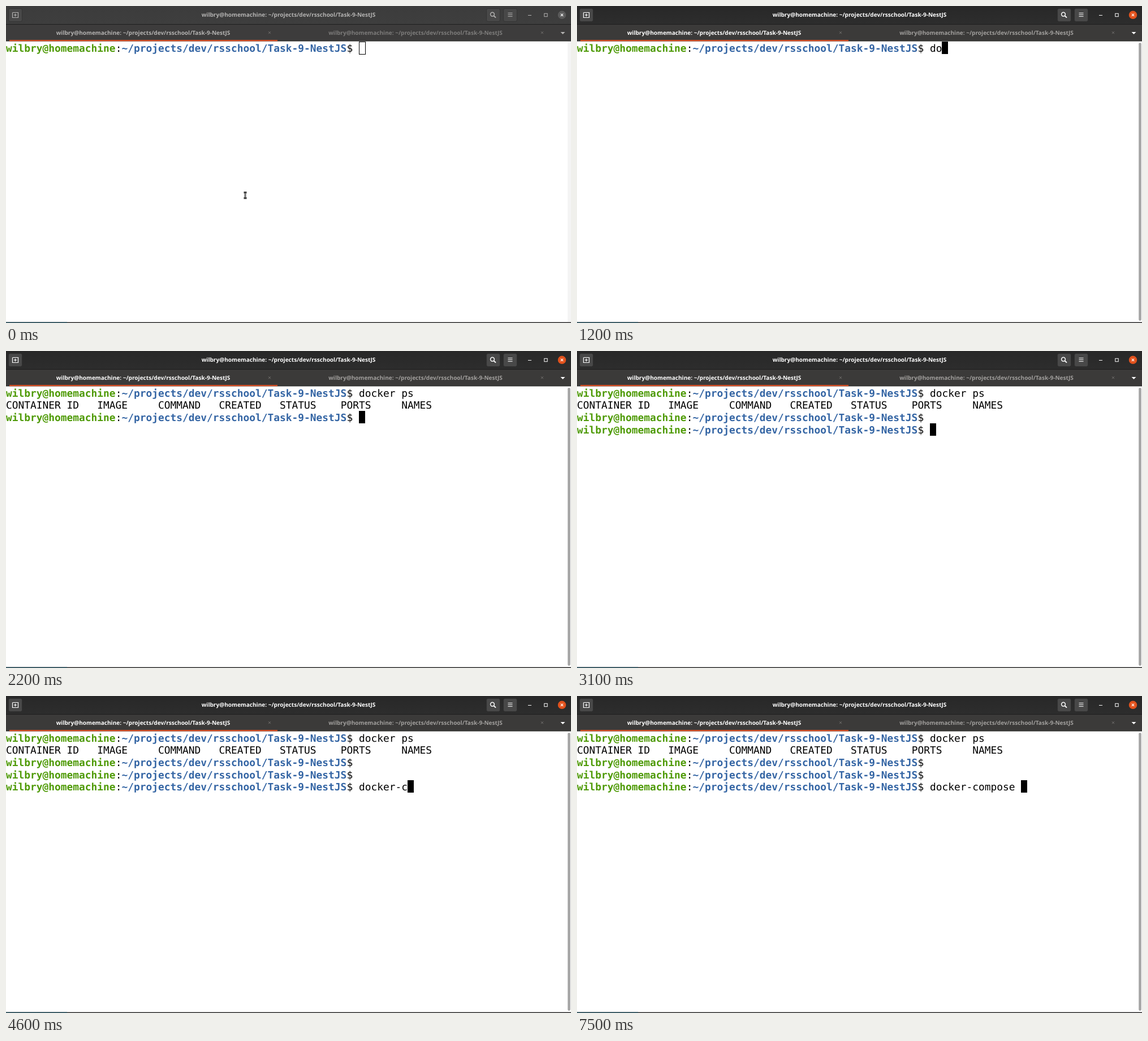
Write an HTML page that moves like this. It is 999x561 px and loops after 8 s.

```html
<!DOCTYPE html>
<html lang="en">
<head>
<meta charset="utf-8">
<title>Terminal</title>
<style>
html, body { margin: 0; width: 100%; height: 100%; overflow: hidden; background: #fff; }
svg { display: block; width: 999px; height: 561px; }
text { white-space: pre; text-rendering: geometricPrecision; }
.ui { font: 700 10px "Open Sans", "Noto Sans", sans-serif; text-anchor: middle; fill: var(--fg); }
.term { font: 17.87px "DejaVu Sans Mono", monospace; fill: #000; }
.bold { font-weight: 700; }
.line { fill: none; stroke: var(--fg); }
#stage { --fg: #fff; --dim: #a19f9d; --bar1: #282828; --bar2: #2d2d2d; --tab: #3b3a39; --btn: #484848; --close: #e2521d; }
#stage.idle { --fg: #b4b3b2; --dim: #7d7c7b; --bar1: #3c3c3c; --bar2: #3e3e3e; --tab: #3d3c3c; --btn: #484848; --close: #5b5b5b; }
.idle #thumb { display: none; }
#track { display: none; }
.idle #track { display: block; }
</style>
</head>
<body>
<svg id="stage" viewBox="0 0 999 561">
  <defs>
    <linearGradient id="bar" x2="0" y2="1">
      <stop style="stop-color:var(--bar1)"/>
      <stop offset="1" style="stop-color:var(--bar2)"/>
    </linearGradient>
  </defs>
  <rect width="999" height="561" fill="#fff"/>

  <!-- title bar -->
  <rect width="999" height="32" fill="url(#bar)"/>
  <rect y="32" width="999" height="1" fill="#1e1e1e"/>
  <g style="fill:var(--btn)" stroke="#2a2a2a" stroke-opacity=".6">
    <rect x="4.5" y="4.5" width="24" height="23" rx="3"/>
    <rect x="849.5" y="4.5" width="24" height="23" rx="3"/>
    <rect x="879.5" y="4.5" width="24" height="23" rx="3"/>
  </g>
  <g class="line">
    <path d="M12 11.5H21.5V20.5H11.5V11.5M16.5 13.5v5M14 16h5" stroke-width="1.2"/>
    <circle cx="860" cy="14.7" r="3.4" stroke-width="1.5"/>
    <path d="M862.6 17.3l3.4 3.4" stroke-width="1.9"/>
    <path d="M887.5 12.5h8M887.5 15.5h8M887.5 18.5h8" stroke-width="1.2"/>
    <path d="M923 16.5h6"/>
    <rect x="951.8" y="13.3" width="5.4" height="5.4"/>
  </g>
  <circle cx="983" cy="15.8" r="7.2" style="fill:var(--close)"/>
  <path d="M980.8 13.6l4.4 4.4m0-4.4l-4.4 4.4" stroke="#fff" stroke-width="1.1"/>
  <text class="ui" x="499.5" y="19.3"></text>

  <!-- tabs -->
  <rect y="33" width="999" height="29" style="fill:var(--tab)"/>
  <rect y="61.5" width="999" height="1" fill="#252423"/>
  <rect x="6" y="60" width="474" height="2.3" fill="#d64e24"/>
  <text class="ui" x="242.5" y="51"></text>
  <text class="ui" x="724" y="51" style="fill:var(--dim)"></text>
  <path d="M464 45.2l4 4m0-4l-4 4M946 45.2l4 4m0-4l-4 4" stroke="#72706e"/>
  <path d="M980.5 46h8l-4 4z" style="fill:var(--fg)"/>

  <!-- scrollbar -->
  <rect id="track" x="993" y="63" width="6" height="496" fill="#f4f4f4"/>
  <rect id="thumb" x="993.2" y="65" width="4.6" height="492" rx="2.3" fill="#a5a5a5"/>

  <g id="rows"></g>
  <rect id="block"/>

  <g id="pointer">
    <path d="M420.5 330h2l.5.5.5-.5h2M423 330.5v9M420.5 340h2l.5-.5.5.5h2" fill="none" stroke="#333" stroke-width="2.8"/>
    <path d="M423 331v8" stroke="#ddd" stroke-width=".8"/>
  </g>

  <!-- window edge -->
  <rect y="559.5" width="999" height="1.5" fill="#2b2b2b"/>
  <rect y="559.5" width="108" height="1.5" fill="#28505c"/>
</svg>
<script>
const LOOP = 8000, CELL = 10.758, PITCH = 21.55, TOP = 63.2;
const USER = "wilbry@homemachine", DIR = "~/projects/dev/rsschool/Task-9-NestJS";
const HEAD = ["CONTAINER ID", "IMAGE", "COMMAND", "CREATED", "STATUS", "PORTS", "NAMES"];
const HEAD_COLS = [0, 15, 25, 35, 45, 55, 65];
const PROMPT_COLS = 58;

const FOCUS = 400, HIDE_POINTER = 1000, ENTER = [2200, 3100, 3300];
const FIRST = { text: "docker ps", times: [900, 1200, 1300, 1500, 1600, 1700, 1800, 1900, 2000] };
const SECOND = {
  text: "docker-compose ",
  times: [3500, 3600, 3800, 3900, 4000, 4100, 4400, 4600, 4700, 4900, 5100, 5300, 5600, 5700, 6300]
};
const BLINK_OFF = [[2800, 3100], [6900, 7500]];

const $ = id => document.getElementById(id);
const stage = $("stage"), block = $("block"), pointer = $("pointer");

function make(tag, parent, attrs = {}) {
  const el = document.createElementNS(stage.namespaceURI, tag);
  for (const key in attrs) el.setAttribute(key, attrs[key]);
  return parent.appendChild(el);
}

function put(parent, col, row, text, fill = "#000", bold = false) {
  const el = make("text", parent, {
    class: bold ? "term bold" : "term", x: col * CELL, y: TOP + 17.7 + row * PITCH, fill
  });
  el.style.fill = fill;
  el.textContent = text;
  return el;
}

function prompt(row) {
  const g = make("g", $("rows"));
  put(g, 0, row, USER, "#4e9a06", true);
  put(g, USER.length, row, ":");
  put(g, USER.length + 1, row, DIR, "#3465a4", true);
  put(g, USER.length + 1 + DIR.length, row, "$");
  return g;
}

// Set the interface font so that a caption spans its usual 308 px.
const captions = [...document.querySelectorAll(".ui")];
captions.forEach(el => el.textContent = `${USER}: ${DIR}`);
const size = 10 * 308 / captions[0].getComputedTextLength();
captions.forEach(el => el.style.fontSize = size + "px");

prompt(0);
const header = make("g", $("rows"));
HEAD.forEach((word, i) => put(header, HEAD_COLS[i], 1, word));
const prompts = [2, 3, 4].map(prompt);
const firstLine = put($("rows"), PROMPT_COLS, 0, "");
const secondLine = put($("rows"), PROMPT_COLS, 4, "");

const show = (el, on) => el.style.display = on ? "" : "none";
const count = (times, t) => times.filter(x => x <= t).length;

function draw(t) {
  const idle = t < FOCUS;
  const entered = count(ENTER, t);
  const a = count(FIRST.times, t), b = count(SECOND.times, t);

  stage.setAttribute("class", idle ? "idle" : "");
  show(pointer, t < HIDE_POINTER);
  show(header, entered > 0);
  prompts.forEach((g, i) => show(g, entered > i));
  firstLine.textContent = FIRST.text.slice(0, a);
  secondLine.textContent = SECOND.text.slice(0, b);

  const row = entered ? entered + 1 : 0;
  const col = PROMPT_COLS + (entered ? b : a);
  const x = Math.round(col * CELL), y = Math.round(TOP + row * PITCH);
  const inset = idle ? 0.5 : 0;
  const box = { x: x + inset, y: y + inset, width: 11, height: 22,
    fill: idle ? "none" : "#000", stroke: idle ? "#000" : "none" };
  for (const key in box) block.setAttribute(key, box[key]);
  show(block, !BLINK_OFF.some(([from, to]) => t >= from && t < to));
}

const start = performance.now();
function tick() {
  draw((performance.now() - start) % LOOP);
  requestAnimationFrame(tick);
}
tick();
</script>
</body>
</html>
```
